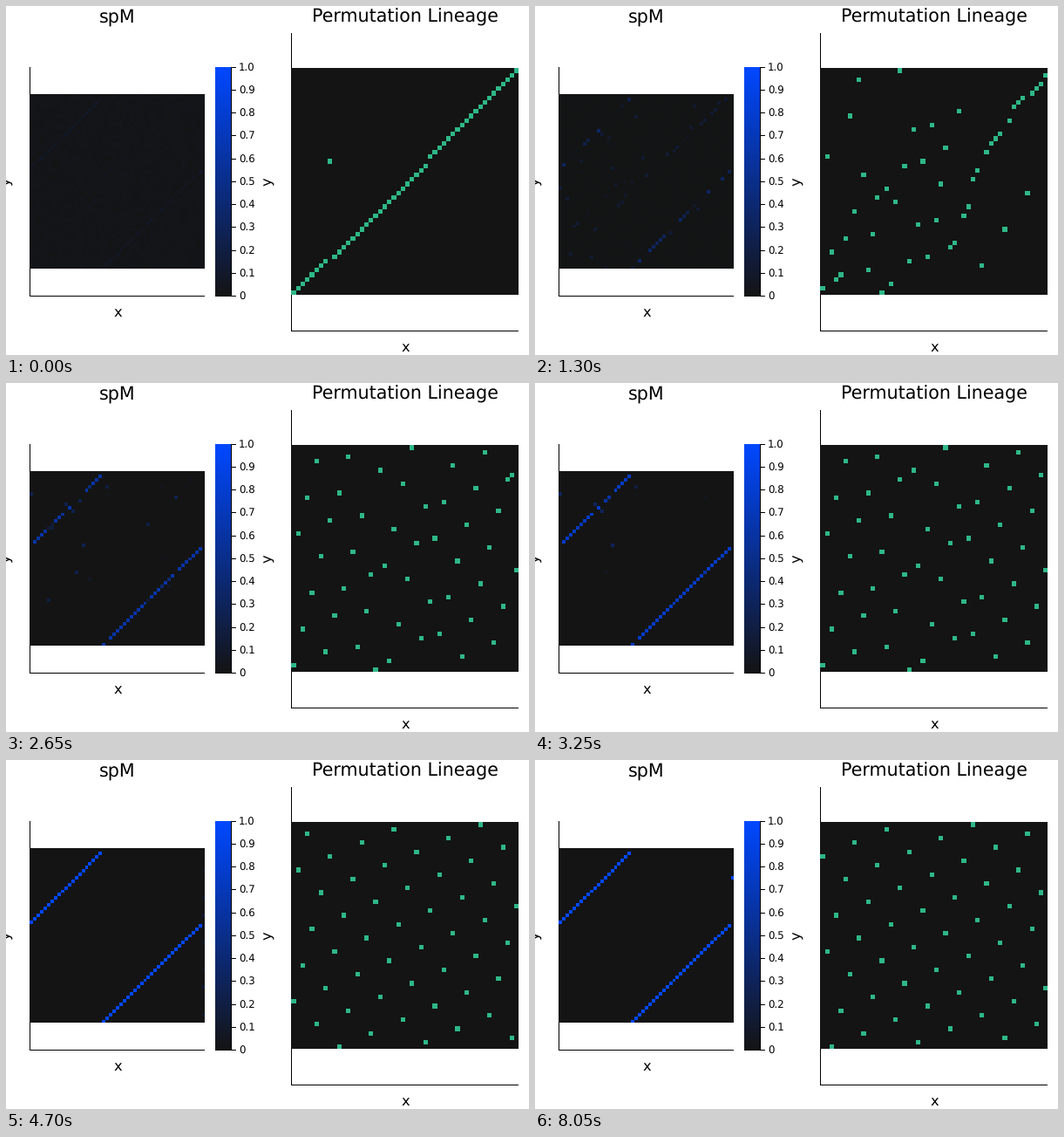
Animation, 600 px wide and 400 px high, one loop 10 s. Source, as a matplotlib script:

```python
import numpy as np
import matplotlib.pyplot as plt
from matplotlib.animation import FuncAnimation
from matplotlib.colors import LinearSegmentedColormap, ListedColormap

N, STEP = 50, 29
START = N                      # extra matrix column holding the first item
FRAMES, INTERVAL = 200, 50
RATE = 0.17
DARK, BLUE, GREEN = "#141414", "#0048ff", "#2eb887"

plt.rcParams["text.hinting"] = "none"
rng = np.random.default_rng(4)


def expand(*runs):
    """Each run is (first value, length), climbing by STEP modulo N."""
    return [(v + STEP * i) % N for v, n in runs for i in range(n)]


first = list(range(N))
first.insert(8, first.pop(29))
sorted_runs = expand((1, 10), (39, 10), (44, 5), (41, 7), (29, 18))
lattice = expand((41, N))
final = expand((42, N))


def longest_rising(seq):
    chains = []
    for x in seq:
        best = max((c for c in chains if c[-1] < x), key=len, default=[])
        chains.append(best + [x])
    return max(chains, key=len)


def route(a, b, lead=None):
    """Turn a into b by moving one item at a time."""
    place = {v: i for i, v in enumerate(b)}
    settled = {b[i] for i in longest_rising([place[v] for v in a])}
    movers = [v for v in b if v not in settled]
    if lead is None:
        rng.shuffle(movers)
    else:
        movers.sort(key=lambda v: (place[v] + lead) % N)
    states, cur = [list(a)], list(a)
    for v in movers:
        cur.remove(v)
        before = [u for u in settled if place[u] < place[v]]
        at = cur.index(max(before, key=place.get)) + 1 if before else 0
        cur.insert(at, v)
        settled.add(v)
        states.append(list(cur))
    return states


def ease_out(u):
    return 1 - (1 - u) ** 2


def linear(u):
    return u


def build_lineage():
    legs = [(0, 65, route(first, sorted_runs), ease_out),
            (65, 82, route(sorted_runs, lattice, 10), linear),
            (82, 103, route(lattice, final, 0), linear)]
    perms = [final] * FRAMES
    for k0, k1, states, ease in legs:
        for k in range(k0, k1 + 1):
            u = ease((k - k0) / (k1 - k0))
            perms[k] = states[round((len(states) - 1) * u)]
    return perms


def build_matrices(perms):
    """Running average of the successor pairs, with growing weight."""
    size = N + 1
    prior = 0.02 * rng.uniform(0.4, 1.6, (size, size))
    for a in range(N):
        prior[(a + STEP) % N, a] += rng.uniform(0.02, 0.06)
    avg = np.zeros((size, size))
    result = []
    for k, perm in enumerate(perms):
        weight = min(1, (k + 8) / 90)
        pairs = list(zip(perm, perm[1:]))
        good = [(a + STEP) % N == b for a, b in pairs]
        goal = np.zeros_like(avg)
        for (a, b), ok in zip(pairs, good):
            goal[b, a] = weight if ok else 0.4 * weight
        goal[perm[0], START] = weight * all(good)
        # the last item has no successor, so its column is left alone
        live = np.arange(size) != perm[-1]
        avg[:, live] += RATE * (goal - avg)[:, live]
        result.append(np.clip(avg + prior * 0.96 ** k, 0, 1))
    return result


def grid(perm):
    cells = np.zeros((N, N))
    cells[perm, np.arange(N)] = 1
    return cells


def to_pixels(cells, width, height):
    """Enlarge to whole pixels, row 0 at the bottom."""
    rows = np.arange(height) * len(cells) // height
    cols = np.arange(width) * len(cells) // width
    return cells[::-1][np.ix_(rows, cols)]


def left_image(k):
    return to_pixels(matrices[k], 201, 200)


def right_image(k):
    return to_pixels(grid(lineage[k]), 261, 260)


lineage = build_lineage()
matrices = build_matrices(lineage)

fig = plt.figure(figsize=(6, 4), dpi=100, facecolor="white")
ax = fig.add_axes([0, 0, 1, 1])
ax.axis("off")
blues = LinearSegmentedColormap.from_list("blues", [DARK, BLUE])


def heat(data, extent, cmap):
    return ax.imshow(data, extent=extent, cmap=cmap, vmin=0, vmax=1,
                     aspect="auto", interpolation="nearest")


def line(x0, y0, x1, y1):
    ax.plot([x0, x1], [y0, y1], color="black", lw=0.72, snap=False,
            solid_capstyle="butt", zorder=-1)


def label(x, y, text, px, **kw):
    ax.text(x, y, text, fontsize=px * 0.72, family="DejaVu Sans",
            color="black", **{"ha": "center", "va": "baseline", **kw})


def panel(left, right, top, bottom, title):
    line(left + 0.5, top, left + 0.5, bottom + 1)
    line(left, bottom + 0.5, right, bottom + 0.5)
    mid = (left + 1 + right) / 2
    label(mid, 18.3, title, 20.7)
    label(mid, bottom + 24, "x", 16.3)
    label(left - 22, 201.5, "y", 16.3, rotation=90, rotation_mode="anchor")


left_map = heat(left_image(0), (27, 228, 301, 101), blues)
right_map = heat(right_image(0), (327, 588, 331, 71),
                 ListedColormap([DARK, GREEN]))
heat(np.linspace(1, 0, 263)[:, None], (240, 258, 333, 70), blues)

panel(27, 228, 70, 332, "spM")
panel(327, 588, 31, 372, "Permutation Lineage")

line(258.5, 70, 258.5, 333)
for i in range(11):
    y = int(332.5 - 26.25 * i) + 0.5
    line(258, y, 264, y)
    label(267, y + 4.3, f"{i / 10:.1f}" if i else "0", 11.8, ha="left")

ax.set_xlim(0, 600)
ax.set_ylim(400, 0)


def update(k):
    left_map.set_data(left_image(k))
    right_map.set_data(right_image(k))
    return left_map, right_map


anim = FuncAnimation(fig, update, frames=FRAMES, interval=INTERVAL,
                     repeat=True, repeat_delay=0)
plt.show()
```
